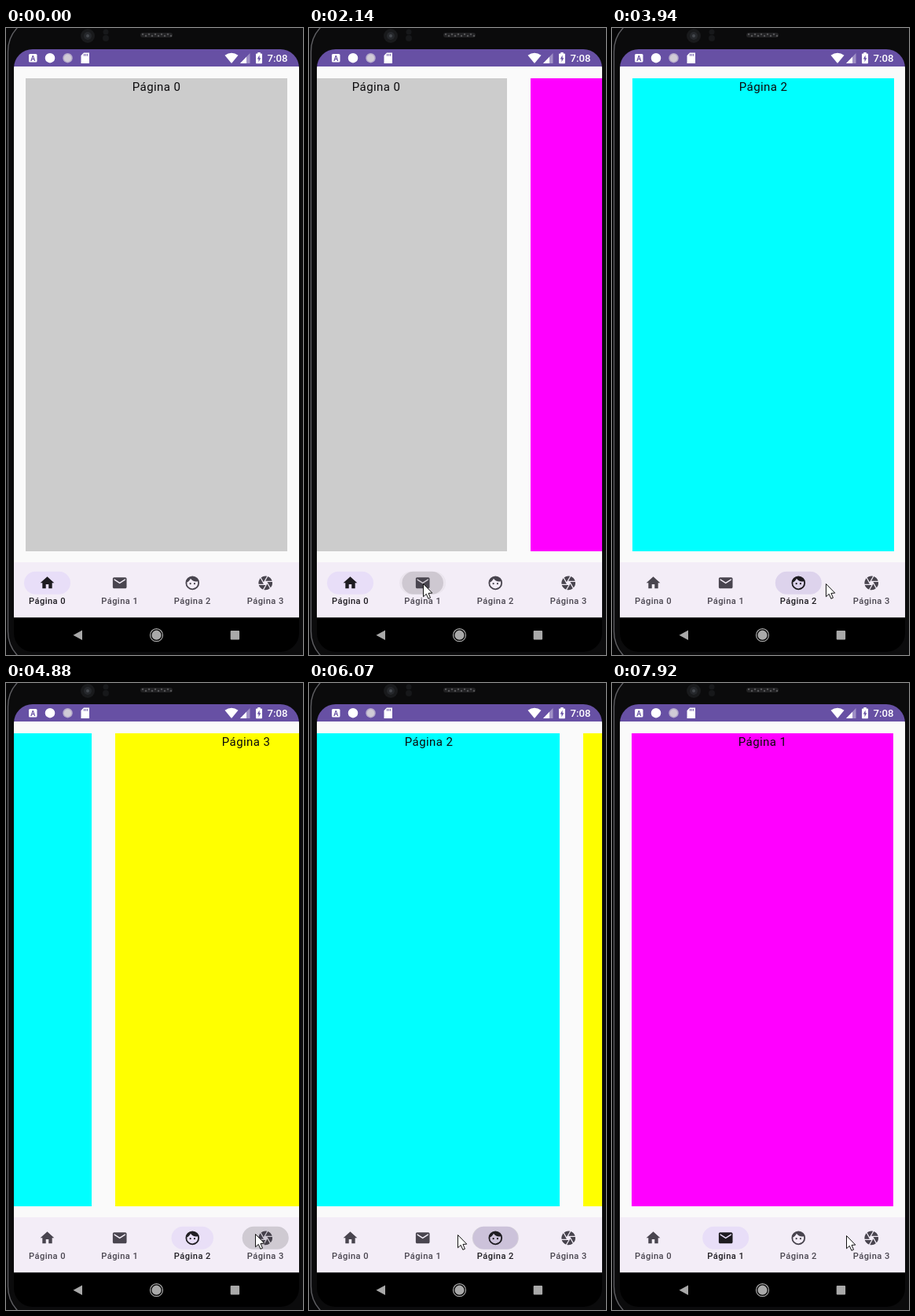
An HTML page with a canvas for the animation above (7990 ms loop, 378 px wide and 798 px high).

```html
<!DOCTYPE html>
<html lang="pt">
<head>
<meta charset="utf-8">
<title>Pager</title>
<style>
html, body { margin: 0; width: 100%; height: 100%; overflow: hidden; background: #000; }
canvas { display: block; width: 378px; height: 798px; }
</style>
</head>
<body>
<canvas id="stage"></canvas>
<script>
const W = 378, H = 798, LOOP = 7990;
const STEP = 68.8, PHASE = 1715;
const SCREEN = { x: 10, y: 27, w: 363, h: 767 };
const canvas = document.getElementById('stage');
const ctx = canvas.getContext('2d');
const dpr = window.devicePixelRatio || 1;
canvas.width = W * dpr;
canvas.height = H * dpr;

const PAGES = ['#cccccc', '#ff00ff', '#00ffff', '#ffff00'];
const TAB_X = [52.5, 144.7, 237.3, 330.2];
const TAB_Y = 706.3;
const INK = [29, 27, 32], MUTED = [73, 69, 79];

// Each tap: page left, page opened, hover, press and scroll start times
const TAPS = [
  { from: 0, to: 1, hover: 1715, press: 1934, start: 2074 },
  { from: 1, to: 2, hover: 3366, press: 3370, start: 3517 },
  { from: 2, to: 3, hover: 4600, press: 4610, start: 4761 },
  { from: 3, to: 2, hover: 5640, press: 5715, start: 5860 },
  { from: 2, to: 1, hover: 6540, press: 6615, start: 6758 }
];

// Pointer path: time, x, y
const POINTER = [
  [1160, 0, 567], [1300, 72, 640], [1440, 149, 716], [1580, 145, 707],
  [2540, 145, 707], [2950, 229, 709], [3700, 229, 709], [3917, 272, 707],
  [4130, 300, 704], [4460, 317, 701], [5150, 317, 701], [5560, 232, 705],
  [5860, 232, 705], [6049, 189, 702], [6330, 156, 707], [7770, 156, 707],
  [7905, 298, 703]
];

const ICONS = {
  home: new Path2D('M10 20v-6h4v6h5v-8h3L12 3 2 12h3v8z'),
  mail: new Path2D('M20 4H4c-1.1 0-2 .9-2 2v12c0 1.1.9 2 2 2h16c1.1 0 2-.9 2-2V6c0-1.1-.9-2-2-2zm0 4l-8 5-8-5V6l8 5 8-5z'),
  face: new Path2D('M2 12a10 10 0 1 0 20 0a10 10 0 1 0-20 0z' +
    'M4.05 11.14C6.41 10.09 8.28 8.16 9.26 5.77C11.07 8.33 14.05 10 17.42 10c.78 0 1.53-.09 2.25-.26A8 8 0 1 1 4.05 11.14z' +
    'M7.75 13a1.25 1.25 0 1 0 2.5 0a1.25 1.25 0 1 0-2.5 0z' +
    'M13.75 13a1.25 1.25 0 1 0 2.5 0a1.25 1.25 0 1 0-2.5 0z'),
  blade: new Path2D('M9.4 10.5l4.77-8.26C13.47 2.09 12.75 2 12 2c-2.4 0-4.6.85-6.32 2.25l3.66 6.35z')
};
const TAB_ICONS = ['home', 'mail', 'face', 'blade'];

const clamp = (v) => Math.max(0, Math.min(1, v));
const smooth = (v) => v * v * (3 - 2 * v);
const mix = (a, b, p) => `rgb(${a.map((v, i) => Math.round(v + (b[i] - v) * p)).join(',')})`;

function rounded(x, y, w, h, r, fill) {
  ctx.beginPath();
  ctx.roundRect(x, y, w, h, r);
  ctx.fillStyle = fill;
  ctx.fill();
}

function disc(x, y, r, fill) {
  ctx.beginPath();
  ctx.arc(x, y, r, 0, 2 * Math.PI);
  ctx.fillStyle = fill;
  ctx.fill();
}

function poly(points, fill) {
  ctx.beginPath();
  points.forEach(([x, y]) => ctx.lineTo(x, y));
  ctx.closePath();
  ctx.fillStyle = fill;
  ctx.fill();
}

function label(text, x, y, size, weight, color, spacing = 0) {
  ctx.font = `${weight} ${size}px Roboto, sans-serif`;
  ctx.letterSpacing = spacing + 'px';
  ctx.textAlign = 'center';
  ctx.fillStyle = color;
  ctx.fillText(text, x, y);
}

// Critically damped spring from 0 to 1
function spring(ms) {
  if (ms <= 0) return 0;
  const x = ms * 0.02;
  return 1 - (1 + x) * Math.exp(-x);
}

function scrollAt(t) {
  return TAPS.reduce((pos, tap) => pos + (tap.to - tap.from) * spring(t - tap.start), 0);
}

function selection(t) {
  const on = [1, 0, 0, 0];
  for (const tap of TAPS) {
    const p = smooth(clamp((t - tap.start - 100) / 100));
    on[tap.from] -= p;
    on[tap.to] += p;
  }
  return on;
}

function pointerAt(t) {
  if (t < POINTER[0][0]) return null;
  const i = POINTER.findIndex((k) => k[0] > t);
  if (i < 0) return POINTER[POINTER.length - 1].slice(1);
  const [t0, x0, y0] = POINTER[i - 1], [t1, x1, y1] = POINTER[i];
  const p = (t - t0) / (t1 - t0);
  return [x0 + (x1 - x0) * p, y0 + (y1 - y0) * p];
}

function drawPhone() {
  ctx.fillStyle = '#060607';
  ctx.fillRect(0, 0, W, H);
  rounded(2.5, -15, 420, 828, 45, '#0b0b0c');
  ctx.strokeStyle = '#5f5f63';
  ctx.lineWidth = 1.4;
  ctx.stroke();
  disc(104, 10, 9, '#191a1c');
  disc(104, 10, 5, '#26282c');
  disc(104, 10, 2, '#45484e');
  disc(127, 5, 3.5, '#17181a');
  disc(127, 13, 4, '#17181a');
  rounded(171, 6, 41, 6, 3, '#222224');
  for (let i = 0; i < 10; i++) disc(174 + i * 4, 8 + (i % 2) * 2, 1.2, '#555558');
}

function drawStatus() {
  ctx.fillStyle = '#6750a4';
  ctx.fillRect(10, 27, 363, 22);
  rounded(29, 33, 10.5, 10.5, 1.5, '#fff');
  label('A', 34.3, 41.6, 9, 700, '#6750a4');
  disc(56, 38.2, 6.2, '#fff');
  disc(78.5, 38.2, 6.2, '#b5aacb');
  disc(78.5, 38.2, 4.7, '#d0cbd6');
  poly([[99, 31.5], [106, 31.5], [106, 45], [95.5, 45], [95.5, 35]], '#fff');
  ctx.fillStyle = '#6750a4';
  for (let i = 0; i < 3; i++) ctx.fillRect(99 + i * 2.1, 33, 1, 2.6);

  ctx.beginPath();
  ctx.moveTo(287, 45);
  ctx.lineTo(278.5, 34.8);
  ctx.quadraticCurveTo(287, 28.5, 295.5, 34.8);
  ctx.closePath();
  ctx.fillStyle = '#fff';
  ctx.fill();
  poly([[298, 45], [310.5, 32], [310.5, 45]], '#9f90c6');
  poly([[298, 45], [306, 36.7], [306, 45]], '#fff');
  rounded(318, 32.5, 8, 12.7, 1, '#fff');
  ctx.fillRect(320.3, 31, 3.4, 2);
  poly([[322.6, 34.5], [319.8, 39.4], [321.5, 39.4], [321.5, 43.2], [324.3, 38.2], [322.6, 38.2]], '#6750a4');
  label('7:08', 345.5, 43, 13.2, 500, '#fff');
}

function drawPages(t) {
  ctx.fillStyle = '#fafafa';
  ctx.fillRect(10, 49, 363, 631);
  const pos = scrollAt(t);
  PAGES.forEach((color, i) => {
    const x = Math.round(25 + 363 * (i - pos));
    if (x > 373 || x + 333 < 10) return;
    ctx.fillStyle = color;
    ctx.fillRect(x, 64, 333, 602);
    label('Página ' + i, x + 166.6, 80, 15, 400, '#0c0b0d', 0.45);
  });
}

function drawIcon(name, x, color) {
  ctx.save();
  ctx.translate(x, TAB_Y);
  ctx.scale(0.883, 0.883);
  ctx.fillStyle = color;
  const turns = name === 'blade' ? 6 : 1;
  for (let i = 0; i < turns; i++) {
    ctx.save();
    ctx.rotate(i * Math.PI / 3);
    ctx.translate(-12, -12);
    ctx.fill(ICONS[name], 'evenodd');
    ctx.restore();
  }
  ctx.restore();
}

function pill(i, width, fill) {
  rounded(TAB_X[i] - width / 2, TAB_Y - 14.5, width, 29, Math.min(14.5, width / 2), fill);
}

function drawRipples(t) {
  for (const tap of TAPS) {
    const fade = clamp((tap.start + 517 - t) / 420);
    const hover = 0.04 * clamp((t - tap.hover) / 120) * fade;
    if (hover > 0) pill(tap.to, 59, `rgba(29,27,32,${hover})`);
    const held = t - tap.press;
    const alpha = 0.14 * clamp(held / 75) * fade;
    if (alpha > 0) pill(tap.to, 59 * Math.min(1, 0.3 + 0.7 * held / 230), `rgba(29,27,32,${alpha})`);
  }
}

function drawTabs(t) {
  ctx.fillStyle = '#f3edf7';
  ctx.fillRect(10, 680, 363, 70.5);
  const on = selection(t);
  on.forEach((p, i) => {
    if (p > 0.01) pill(i, 59 * p, `rgba(232,222,248,${clamp(p)})`);
  });
  drawRipples(t);
  on.forEach((p, i) => {
    const color = mix(MUTED, INK, clamp(p));
    drawIcon(TAB_ICONS[i], TAB_X[i], color);
    label('Página ' + i, TAB_X[i], 733, 11.1, 500, color, 0.45);
  });
}

function drawSystemBar() {
  ctx.fillStyle = '#000';
  ctx.fillRect(10, 750.5, 363, 44);
  poly([[85.5, 772.7], [97, 766.5], [97, 779]], '#a9a9a9');
  disc(191.5, 772.7, 6.1, '#a9a9a9');
  ctx.beginPath();
  ctx.arc(191.5, 772.7, 8, 0, 2 * Math.PI);
  ctx.strokeStyle = '#a9a9a9';
  ctx.lineWidth = 1.2;
  ctx.stroke();
  rounded(285.7, 767, 11.4, 11.4, 1, '#a9a9a9');
}

function drawPointer(t) {
  const at = pointerAt(t);
  if (!at) return;
  ctx.save();
  ctx.translate(at[0] + 0.5, at[1] + 0.5);
  poly([[0, 0], [0, 16.3], [3.8, 12.9], [6.4, 18.8], [9, 17.7], [6.5, 11.9], [11.3, 11.6]], '#fff');
  ctx.strokeStyle = '#111';
  ctx.lineWidth = 1;
  ctx.stroke();
  ctx.restore();
}

function draw(t) {
  ctx.setTransform(dpr, 0, 0, dpr, 0, 0);
  drawPhone();
  ctx.save();
  ctx.beginPath();
  ctx.roundRect(SCREEN.x, SCREEN.y, SCREEN.w, SCREEN.h, 24);
  ctx.clip();
  drawPages(t);
  drawStatus();
  drawTabs(t);
  drawSystemBar();
  ctx.restore();
  drawPointer(t);
}

const begin = performance.now();
function tick() {
  const t = (performance.now() - begin) % LOOP;
  draw(PHASE + STEP * Math.floor((t - PHASE) / STEP));
  requestAnimationFrame(tick);
}
tick();
</script>
</body>
</html>
```
